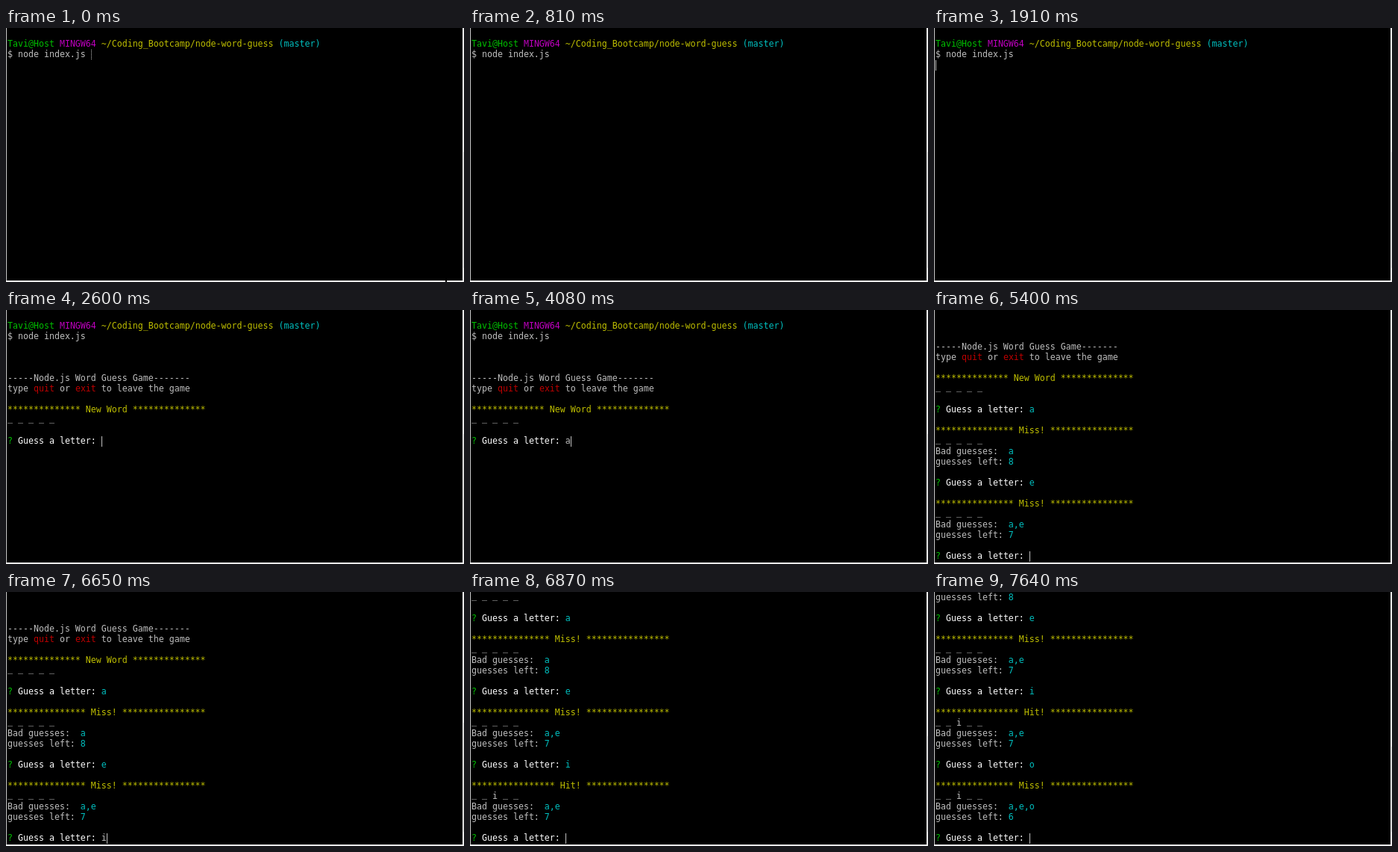
Animation of 614 by 340 pixels, one loop 8 s. Source, as an HTML page:

```html
<!DOCTYPE html>
<html lang="en">
<head>
<meta charset="utf-8">
<title>Word guess terminal</title>
<style>
  html, body { margin: 0; width: 100%; height: 100%; overflow: hidden; background: #000; }
  #stage { position: relative; width: 614px; height: 340px; overflow: hidden; background: #000; }
  #stage > * { position: absolute; }
  #text {
    left: 2px; top: 0; margin: 0; color: #bfbfbf;
    font: 11.628px/14px "DejaVu Sans Mono", monospace;
    white-space: pre; font-variant-ligatures: none;
  }
  #text div { height: 14px; }
  .r { color: #bf0000; }
  .g { color: #00bf00; }
  .y { color: #bfbf00; }
  .m { color: #bf00bf; }
  .c { color: #00bfbf; }
  .w { color: #fff; }
  .blank { position: relative; top: -2px; }
  #caret { width: 1px; height: 14px; background: #bfbfbf; }
  #caret.idle { background: repeating-linear-gradient(#bfbfbf 0 1px, #000 1px 2px); }
  #left { left: 0; top: 0; width: 1px; height: 340px; background: #c8c8c8; }
  #bottom { left: 0; top: 338px; width: 614px; height: 2px; background: #f0f0f0; }
  #track { left: 612px; top: 0; width: 2px; height: 340px; background: #f0f0f0; }
  #thumb { left: 613px; width: 1px; background: #cdcdcd; }
  #pointer { left: 589px; top: 337px; width: 2px; height: 3px; background: #000; }
  #click { left: 582px; top: 310px; width: 24px; height: 24px; border-radius: 50%; background: #787800; }
</style>
</head>
<body>
<div id="stage">
  <div id="text"></div>
  <div id="caret"></div>
  <div id="left"></div>
  <div id="bottom"></div>
  <div id="track"></div>
  <div id="thumb"></div>
  <div id="pointer"></div>
  <div id="click"></div>
</div>
<script>
const LOOP = 8000, ROWS = 24, CELL_W = 7, CELL_H = 14, HISTORY = 23;
const $ = id => document.getElementById(id);
const ink = (cls, s) => `<span class="${cls}">${s}</span>`;
const stars = n => '*'.repeat(n);
const banner = (a, label, b) => ink('y', `${stars(a)} ${label} ${stars(b)}`);
const blanks = word => word.replace(/_/g, ink('blank', '_'));
const ask = ink('g', '?') + ' ' + ink('w', 'Guess a letter:') + ' ';

const shell = [
  '',
  [ink('g', 'Tavi@Host'), ink('m', 'MINGW64'),
   ink('y', '~/Coding_Bootcamp/node-word-guess'), ink('c', '(master)')].join(' '),
  '$ node index.js '
];
const intro = [
  '', '', '',
  '-----Node.js Word Guess Game-------',
  `type ${ink('r', 'quit')} or ${ink('r', 'exit')} to leave the game`,
  '',
  banner(14, 'New Word', 14),
  blanks('_ _ _ _ _'),
  '',
  ask
];

// Adds the accepted letter and the reply to it
function answer(lines, letter, title, word, bad, left) {
  return [
    ...lines.slice(0, -1), ask + ink('c', letter), '',
    title, blanks(word),
    'Bad guesses:  ' + ink('c', bad),
    'guesses left: ' + ink('c', left),
    '', ask
  ];
}

const miss = banner(15, 'Miss!', 16), hit = banner(16, 'Hit!', 16);
const start = [...shell, ...intro];
const afterA = answer(start, 'a', miss, '_ _ _ _ _', 'a', 8);
const afterE = answer(afterA, 'e', miss, '_ _ _ _ _', 'a,e', 7);
const afterI = answer(afterE, 'i', hit, '_ _ i _ _', 'a,e', 7);
const afterO = answer(afterI, 'o', miss, '_ _ i _ _', 'a,e,o', 6);

// time, lines, letter being typed, caret column (-1 hides it)
const steps = [
  [0, shell, '', 16],
  [810, shell, '', -1],
  [1360, shell, '', 16],
  [1910, [...shell, ''], '', 0],
  [2600, start, '', 18],
  [3160, start, '', -1],
  [3700, start, '', 18],
  [4080, start, 'a', 19],
  [4540, afterA, '', 18],
  [5010, afterA, '', -1],
  [5180, afterA, 'e', 19],
  [5400, afterE, '', 18],
  [5940, afterE, '', -1],
  [6400, afterE, '', 18],
  [6650, afterE, 'i', 19],
  [6870, afterI, '', 18],
  [7350, afterI, 'o', 19],
  [7640, afterO, '', 18]
];

const show = (el, on) => { el.style.display = on ? 'block' : 'none'; };
let current;

function drawStep(step) {
  const [, lines, draft, col] = step;
  const view = lines.slice(-ROWS);
  $('text').innerHTML = view
    .map((line, i) => `<div>${line}${i === view.length - 1 ? draft : ''}</div>`).join('');

  const caret = $('caret');
  show(caret, col >= 0);
  caret.style.left = 2 + col * CELL_W + 'px';
  caret.style.top = 1 + (view.length - 1) * CELL_H + 'px';

  const total = HISTORY + Math.max(ROWS, lines.length);
  const size = Math.round(304 * ROWS / total);
  $('thumb').style.top = 321 - size + 'px';
  $('thumb').style.height = size + 'px';
}

function draw(t) {
  const step = steps.findLast(s => s[0] <= t);
  if (step !== current) drawStep(current = step);
  $('caret').className = t < 280 ? 'idle' : '';
  show($('pointer'), t < 70);
  show($('click'), t >= 280 && t < 510);
}

const origin = performance.now();
function tick() {
  draw((performance.now() - origin) % LOOP);
  requestAnimationFrame(tick);
}
tick();
</script>
</body>
</html>
```
